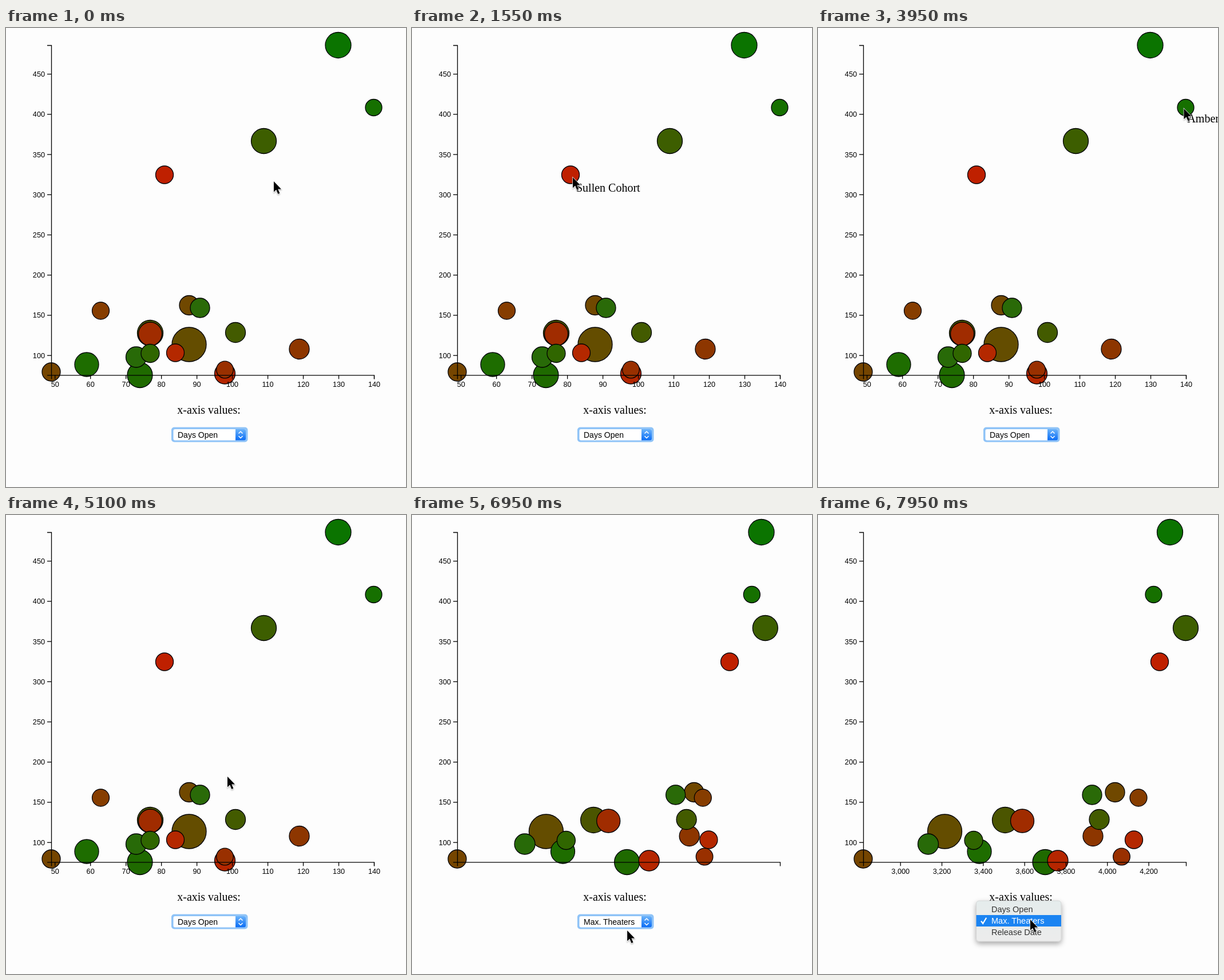
Recreate the animation shown at these times as an HTML page. Size 699x802 px, loop 8 s.

```html
<!DOCTYPE html>
<html lang="en">
<head>
<meta charset="utf-8">
<title>Bubble chart</title>
<style>
  html, body { margin: 0; width: 100%; height: 100%; overflow: hidden; background: #fdfdfd; }
  svg { display: block; }
  text { white-space: pre; }
  .axis { font: 12.7px "Liberation Sans", Arial, sans-serif; }
  .serif { font: 20px "Liberation Serif", Times, serif; }
  .select { font: 14px "Liberation Sans", Arial, sans-serif; }
  .menu { font: 14.5px "Liberation Sans", Arial, sans-serif; }
  .line { fill: none; stroke: #000; stroke-width: 1.3; }
</style>
</head>
<body>
<svg width="699" height="802" viewBox="0 0 699 802">
  <defs>
    <linearGradient id="button" x2="0" y2="1">
      <stop stop-color="#6bb3fa"/><stop offset="1" stop-color="#0a6cf5"/>
    </linearGradient>
    <linearGradient id="panel" x2="0" y2="1">
      <stop stop-color="#e5ecec"/><stop offset="1" stop-color="#ececec"/>
    </linearGradient>
    <filter id="menuShadow" x="-20%" y="-20%" width="140%" height="160%">
      <feDropShadow dx="0" dy="4" stdDeviation="5" flood-opacity=".35"/>
    </filter>
    <filter id="cursorShadow" x="-50%" y="-50%" width="200%" height="200%">
      <feDropShadow dx="0" dy="1.5" stdDeviation="1" flood-opacity=".35"/>
    </filter>
  </defs>
  <g id="stage"></g>
</svg>
<script>
const LOOP = 8000;
const stage = document.getElementById('stage');

// x by days, x by theaters, y, radius, fill, hover title; largest first
const bubbles = [
  [320, 221.5, 553, 30, '#644d00'],
  [252, 327, 533, 22.5, '#4b5500'],
  [580.5, 615, 30, 22.5, '#0b7400', 'Pebble Coast'],
  [234, 397, 606.5, 22, '#1f6a00'],
  [450.5, 642.5, 197.5, 22, '#3d5e00'],
  [141, 282, 588, 21, '#1e6d00'],
  [252, 357, 534.5, 20.5, '#a02c00'],
  [227.5, 192.5, 575, 18, '#286a08'],
  [382.5, 419, 604, 18, '#b52600'],
  [512.5, 480.5, 561, 17.5, '#8d3600'],
  [401, 491.5, 532, 17.5, '#435b00'],
  [320, 519, 484.5, 17, '#704800'],
  [339, 479, 489, 17, '#2a6a08'],
  [252, 272, 568.5, 16, '#306600'],
  [79, 79, 601, 16, '#754500'],
  [296, 552, 567.5, 15.5, '#b42800'],
  [277, 597, 256.5, 15.5, '#bf2000', 'Sullen Cohort'],
  [165.5, 560, 494, 15, '#863d00'],
  [382.5, 530.5, 597, 14.8, '#993000'],
  [642.5, 586.5, 139, 14.5, '#167000', 'Amber Sky: A Far Comet Tale'],
];

// time, x, y of the pointer tip
const pointerPath = [
  [0, 468, 268], [200, 468, 268], [1150, 283, 261], [1550, 281, 261], [1700, 281, 261],
  [2150, 571, 38], [2500, 571, 40], [2700, 570, 83], [3000, 585, 100], [3500, 638, 138],
  [4200, 640, 142], [5100, 387, 457], [5850, 366, 710], [6150, 366, 710],
  [6450, 377, 726], [7100, 376, 726], [7650, 371, 708], [8000, 371, 707],
];

const lerp = (a, b, k) => a + (b - a) * k;
const clamp = v => Math.max(0, Math.min(1, v));
const smooth = k => k * k * (3 - 2 * k);
const cubicInOut = k => k < .5 ? 4 * k ** 3 : 1 - 4 * (1 - k) ** 3;
const range = (from, to, step) =>
  Array.from({ length: (to - from) / step + 1 }, (_, i) => from + i * step);

const daysX = v => 79.5 + (v - 49) * 564 / 91;
const theatersX = v => 79.5 + (v - 2821) * 564 / 1560;

function pointerAt(t) {
  const i = pointerPath.findIndex(p => p[0] > t);
  const [a, b] = [pointerPath[i - 1], pointerPath[i]];
  const k = smooth((t - a[0]) / (b[0] - a[0]));
  return [lerp(a[1], b[1], k), lerp(a[2], b[2], k)];
}

const text = (cls, x, y, content, attrs = '') =>
  `<text class="${cls}" x="${x}" y="${y}" ${attrs}>${content}</text>`;

const bubble = ([x0, x1, y, r, fill], k) =>
  `<circle cx="${lerp(x0, x1, k)}" cy="${y}" r="${r}" fill="${fill}" stroke="#000" stroke-width="1.3"/>`;

function yAxis() {
  const ticks = range(100, 450, 50).map(v => {
    const y = 572.2 - (v - 100) * 1.4046;
    return `<path class="line" d="M72 ${y}h7.5"/>` +
      text('axis', 68, y + 4.5, v, 'text-anchor="end"');
  });
  return '<path class="line" d="M72 30.5H79.5V606.8H72"/>' + ticks.join('');
}

// Leaving and entering ticks travel between their places on both scales.
function xAxis(k) {
  const tick = opacity => v => {
    const x = lerp(daysX(v), theatersX(v), k);
    if (!opacity || x < -30 || x > 730) return '';
    return `<g opacity="${opacity}"><path class="line" d="M${x} 606.8v6.5"/>` +
      text('axis', x, 626.5, v.toLocaleString('en-US'), 'text-anchor="middle"') + '</g>';
  };
  return '<path class="line" d="M79.5 613.5V606.8H643.5V613.5"/>' +
    range(50, 140, 10).map(tick(1 - k)).join('') +
    range(3000, 4200, 200).map(tick(k)).join('');
}

const select = value => `
  <rect x="289" y="697.5" width="133.5" height="26" rx="5" fill="#8fc3f7"/>
  <rect x="292.5" y="701" width="126.5" height="19.5" rx="3" fill="#fff"/>
  <path d="M401 701h15a3 3 0 0 1 3 3v13.5a3 3 0 0 1-3 3h-15z" fill="url(#button)"/>
  <path d="M406.5 708.5l3.5-3.5 3.5 3.5M406.5 713l3.5 3.5 3.5-3.5" fill="none" stroke="#fff" stroke-width="1.5"/>
  ${text('select', 300, 715.7, value)}`;

function menu(top, checked, pointerY) {
  const hovered = Math.max(0, Math.min(2, Math.floor((pointerY - top - 5) / 20)));
  const items = ['Days Open', 'Max. Theaters', 'Release Date'].map((name, i) => {
    const y = top + 5 + i * 20;
    const color = i === hovered ? '#fff' : '#333';
    const bar = i === hovered
      ? `<rect x="276.5" y="${y}" width="148.5" height="20" fill="#1b84f2"/>` : '';
    const check = i === checked
      ? `<path d="M285 ${y + 10.5}l3.2 4.2 6-10" fill="none" stroke="${color}" stroke-width="2.2"/>` : '';
    return bar + check + text('menu', 303, y + 14.5, name, `fill="${color}"`);
  });
  return `<rect x="276.5" y="${top}" width="148.5" height="71" rx="5" fill="url(#panel)"
    stroke="#c4c4c4" stroke-width=".6" filter="url(#menuShadow)"/>` + items.join('');
}

const pointer = (x, y) => `<path transform="translate(${x} ${y})" filter="url(#cursorShadow)"
  d="M0 0V18.5L4.2 14.6 7.3 22 10.4 20.7 7.3 13.4H13Z"
  fill="#000" stroke="#fff" stroke-width="1.3" paint-order="stroke"/>`;

function render(t) {
  const [px, py] = pointerAt(t);
  const k = cubicInOut(clamp((t - 6747) / 300));
  const hovered = bubbles.find(([x0, x1, y, r, , title]) =>
    title && Math.hypot(px - lerp(x0, x1, k), py - y) < r);

  let overlay = '';
  if (t >= 6100 && t < 6735) overlay = menu(694, 0, py);
  if (t >= 7750) overlay = menu(674, 1, py);

  stage.innerHTML =
    bubbles.map(b => bubble(b, k)).join('') + yAxis() + xAxis(k) +
    text('serif', 354.5, 674, 'x-axis values:', 'text-anchor="middle"') +
    select(t < 6735 ? 'Days Open' : 'Max. Theaters') +
    (hovered ? text('serif', px + 6, py + 24.5, hovered[5]) : '') +
    overlay + pointer(px, py);
}

const start = performance.now();
function frame() {
  render((performance.now() - start) % LOOP);
  requestAnimationFrame(frame);
}
frame();
</script>
</body>
</html>
```
